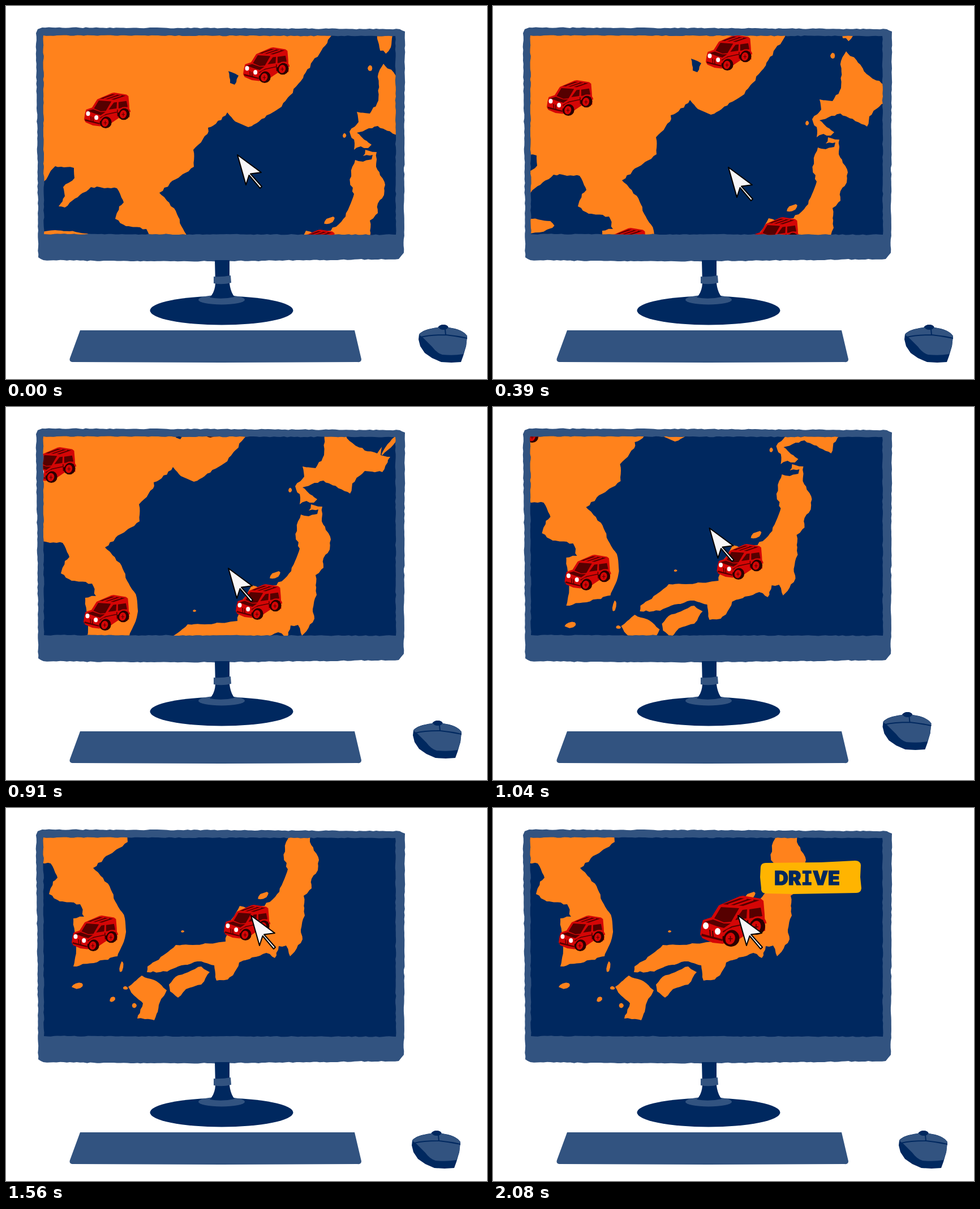
Recreate the animation shown at these times as an HTML page. Size 850 px wide and 659 px high, loop 2730 ms.

```html
<!DOCTYPE html>
<html lang="en">
<head>
<meta charset="utf-8">
<title>Map on a monitor</title>
<style>
  html, body { margin: 0; width: 100%; height: 100%; overflow: hidden; background: #fff; }
  svg { display: block; width: 100%; height: 100%; }
  .steel { fill: #325380; }
  .navy { fill: #00285f; }
  .land { fill: #ff821c; }
  .red { fill: #d40606; }
  .dark { fill: #560000; }
  .tyre { fill: #2c0000; }
</style>
</head>
<body>
<svg viewBox="0 0 850 659">
  <defs>
    <clipPath id="screen"><path id="glass"/></clipPath>
    <g id="wheel">
      <ellipse class="tyre" rx="15" ry="15"/>
      <path d="M-14 -4Q-7 -18 5 -16Q15 -14 16 -5" fill="none" stroke="#d40606" stroke-width="3"/>
      <ellipse class="red" cx="-1" cy="1" rx="8.500" ry="10.500" transform="rotate(16)"/>
      <path d="M-1 -4v10M-5 1h8" stroke="#560000" stroke-width="1.600"/>
    </g>
    <g id="car">
      <path class="tyre" d="M3 68L8 76L24 82L20 70Z"/>
      <path class="red" d="M2 54L5 43L20 38L33 17L70 1L76 0L107 5L112 9L114 33L115 62L88 64L70 76L40 85L22 83L4 75L0 68Z"/>
      <path class="dark" d="M40 15L71 4L105 8L76 18ZM25 40L37 20L69 22L55 46L42 47ZM62 43L75 25L83 24L82 40ZM87 24L107 21L110 36L87 40ZM8 46L23 42L42 49L54 49L42 57L30 54ZM3 67L40 77L39 80L2 71Z"/>
      <path d="M50 16L82 5M61 18L94 7" stroke="#d40606" stroke-width="3"/>
      <path d="M17 60l1 11M22 62l1 11M40 64L56 55L84 49L112 43M84 43L85 60" fill="none" stroke="#560000" stroke-width="2.200"/>
      <use href="#wheel" x="54.500" y="75"/>
      <use href="#wheel" x="100" y="54"/>
      <ellipse cx="10" cy="53" rx="5" ry="6" fill="#fff"/>
      <ellipse cx="31" cy="63" rx="5" ry="6" fill="#fff"/>
    </g>
  </defs>

  <path id="frame" class="steel"/>
  <ellipse class="navy" cx="381" cy="538" rx="126.500" ry="25.500"/>
  <ellipse class="steel" cx="381" cy="519" rx="41" ry="8.500"/>
  <path class="navy" d="M369 449L395 449L395 490Q397 506 404 514Q382 519 360 515Q369 506 370 490Z"/>
  <path class="steel" d="M367 478Q382 479 397 476L398 489Q382 493 367 490Z"/>
  <path class="steel" d="M131 573L616 573L628 624Q628 630 621 629L380 630L117 629Q111 628 113 622Z"/>

  <g clip-path="url(#screen)">
    <rect class="navy" x="60" y="45" width="635" height="365"/>
    <g id="map">
      <path id="land" class="land"/>
      <path id="lake" class="navy"/>
      <use href="#car" transform="translate(21 -71) scale(.7)"/>
      <use href="#car" transform="translate(302 -151) scale(.7)"/>
      <use href="#car" transform="translate(116 190) scale(.7)"/>
      <use href="#car" id="pick"/>
    </g>
  </g>

  <g id="badge">
    <path fill="#ffb400" d="M473 104Q474 97 482 97L580 96L640 93Q649 93 650 101L649 122L651 142Q650 150 642 150L530 152L482 151Q473 150 474 142L472 122Z"/>
    <text class="navy" x="555" y="136" text-anchor="middle" font-family="Inter, sans-serif" font-weight="900" font-size="34" stroke="#00285f" stroke-width="1.200">DR<tspan font-family="'DejaVu Sans Mono', monospace" font-weight="700">I</tspan>VE</text>
  </g>

  <path id="cursor" d="M0 0L42 31L23 33.500L43 56L40 59L20.500 36L15 53Z" fill="#f8f6f8" stroke="#000" stroke-width="2" stroke-linejoin="round"/>

  <g id="mouse">
    <path class="navy" d="M1 17Q8 8 34 5Q37 0 45 0Q52 1 53 5Q78 8 86 20L84 38L79 55L75 66L58 67L40 66L24 59L11 50L3 38L0 26Z"/>
    <path class="steel" d="M1 18Q8 8 36 5Q40 10 52 5Q79 9 86 20L84 38L79 52Q62 55 42 53Q32 50 24 39L8 23Z"/>
    <path d="M4 22Q20 18 48 18Q68 20 86 24M47 8L48 18" fill="none" stroke="#00285f" stroke-width="2"/>
    <ellipse class="navy" cx="44" cy="4.500" rx="8" ry="4.500"/>
  </g>
</svg>
<script>
const $ = id => document.getElementById(id);
const STEP = 130, STEPS = 21;

let seed = 7;
const rand = () => (seed = seed * 16807 % 2147483647) / 2147483647;
const clamp = v => Math.max(0, Math.min(1, v));

// Closed outline through key points, kinked in between to look hand cut.
function rough(text, kink) {
  const pts = text.trim().split(/\s+/).map(p => p.split(',').map(Number));
  const out = [];
  pts.forEach(([x, y], i) => {
    const [nx, ny] = pts[(i + 1) % pts.length];
    const parts = Math.max(1, Math.round(Math.hypot(nx - x, ny - y) / 6));
    for (let k = 0; k < parts; k++) {
      const off = () => k ? (rand() - .5) * kink : 0;
      out.push([x + (nx - x) * k / parts + off(), y + (ny - y) * k / parts + off()]);
    }
  });
  return 'M' + out.map(p => p.map(v => v.toFixed(1)).join(' ')).join('L') + 'Z';
}

// Small island: a tilted ellipse with a seeded ragged rim.
function islet(x, y, rx, ry, tilt = 0) {
  const n = 6 + Math.round((rx + ry) / 4), c = Math.cos(tilt), s = Math.sin(tilt);
  const rim = Array.from({ length: n }, (_, i) => {
    const a = i / n * 2 * Math.PI, r = .9 + rand() * .25;
    const u = Math.cos(a) * rx * r, v = Math.sin(a) * ry * r;
    return (x + u * c - v * s) + ',' + (y + u * s + v * c);
  });
  return rough(rim.join(' '), 1);
}

const continent = `-70,-210 484,-210 443,-150 400,-87 370,-46 340,-26 311,-10
  288,-20 274,-36 254,-16 240,-9 239,2 214,30 215,60 183,82 154,106
  183,138 196,170 210,195 211,225 197,262 155,274 119,280 124,250 119,195 138,192
  131,170 95,165 76,152 83,130 91,123 79,98
  33,96 0,120 -13,132 -24,130 -13,112 -16,96 4,80 3,62 -30,59 -50,86 -70,105`;

const mainIsle = `500,48 514,51 529,47 531,39 514,41 518,30 538,34 537,60 553,92
  551,110 540,125 540,142 526,155 528,190 521,215 524,232 510,254 502,262 495,243
  482,244 475,265 460,256 412,273 404,290 392,303 372,305 368,278 345,271 310,278
  285,289 249,290 250,280 270,268 300,242 330,242 388,236 396,200 413,173 425,177
  457,173 483,148 498,108 491,88 495,60`;

const northIsle = `541,-105 550,-122 571,-102 586,-82 613,-65 635,-60 646,-77
  641,-57 658,-54 644,-27 613,-29 591,-7 587,11 540,-12 518,-5 503,0 529,21 523,27
  510,24 498,30 499,18 490,-2 506,-19 503,-37 526,-34 541,-57`;

const southIsle = '240,296 262,304 284,322 270,348 262,375 232,372 242,345 226,331 216,316';
const smallIsle = '288,312 300,298 345,280 360,290 345,312 318,320 304,335 290,324';

$('land').setAttribute('d', [
  ...[continent, mainIsle, northIsle, southIsle, smallIsle].map(s => rough(s, 3)),
  islet(-22, 186, 52, 13),
  islet(553, -172, 13, 30),
  islet(660, -78, 26, 4, -.85),
  islet(526, -114, 4, 5),
  islet(481, 5, 3, 4),
  islet(455, 155, 10, 5, -.5),
  islet(204, 281, 3, 10, .2),
  islet(127, 314, 10, 5, -.2),
  islet(312, 218, 3, 2),
  islet(211, 318, 4, 3),
  islet(188, 338, 5, 4, -.6),
  islet(227, 349, 4, 4)
].join(''));
$('lake').setAttribute('d', rough('276,-109 294,-101 287,-85 279,-88', 2));
$('glass').setAttribute('d', rough('66,52 688,53 689,404 67,403', 1.5));
$('frame').setAttribute('d', rough(`53,48 56,41 64,38 380,39 696,41 705,45 704,220
  703,436 694,447 380,451 220,451 66,449 57,444 56,300`, 1.5));

// Hand strokes: where cursor and mouse start and how far each travels.
// A gripping stroke pulls the map along; a free one jumps at its end.
const strokes = [
  { at: 0, len: 2, grip: true, cursor: [409, 263], pull: [-43, -22], mouse: [729, 563], slide: [-33, -11] },
  { at: 3, len: 2, grip: true, cursor: [416, 285], pull: [-47, -45], mouse: [727, 563], slide: [-23, -5] },
  { at: 6, len: 1, grip: true, cursor: [399, 300], pull: [-6, -15], mouse: [725, 569], slide: [-6, -15] },
  { at: 7, len: 2, grip: true, cursor: [393, 285], pull: [-21, -142], mouse: [719, 554], slide: [-61, -30] },
  { at: 10, len: 2, grip: false, cursor: [403, 167], pull: [30, 23], mouse: [688, 547], slide: [29, 23] }
];

const place = (id, [x, y], scale = 1) =>
  $(id).setAttribute('transform', `translate(${x} ${y}) scale(${scale})`);
const along = (from, by, t) => from.map((v, k) => v + by[k] * t);

function draw(step) {
  let map = [0, 0];
  for (const s of strokes) {
    let t = clamp((step - s.at) / s.len);
    if (s.grip) map = along(map, s.pull, t - 1);
    else t = Math.floor(t);
    if (step < s.at) continue;
    place('cursor', along(s.cursor, s.pull, t));
    place('mouse', along(s.mouse, s.slide, t));
  }
  place('map', map);

  const grow = clamp((step - 12) / 2);
  place('pick', along([385, 171], [-19, -16], grow), .7 + .3 * grow);
  $('badge').style.display = step >= 16 ? '' : 'none';
}

const start = performance.now();
function tick() {
  draw(Math.floor((performance.now() - start) / STEP) % STEPS);
  requestAnimationFrame(tick);
}
tick();
</script>
</body>
</html>
```
